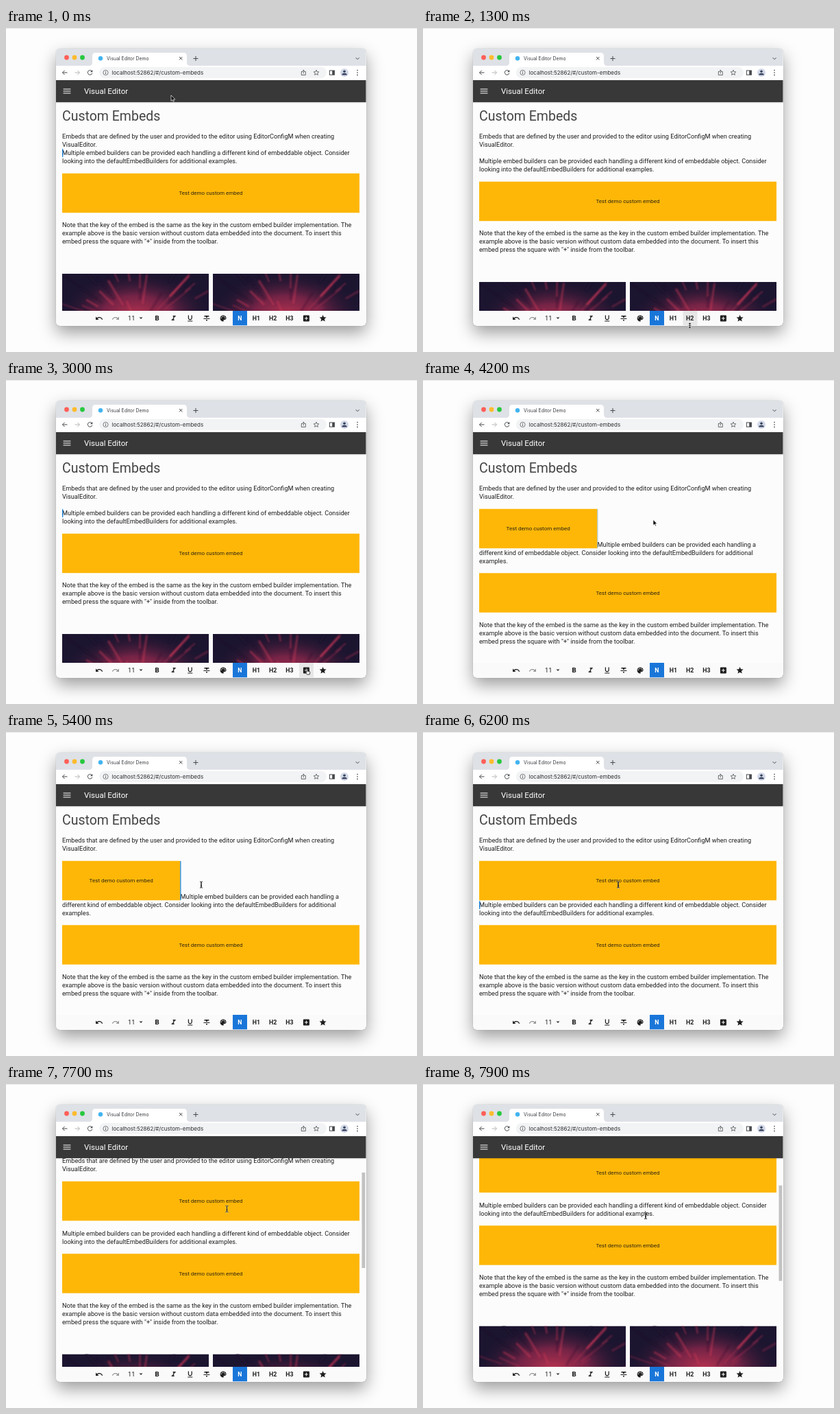
An HTML page for the animation above (8000 ms loop, 600 by 472 pixels).

```html
<!DOCTYPE html>
<html lang="en">
<head>
<meta charset="utf-8">
<title>Visual Editor Demo</title>
<style>
  html, body { margin: 0; width: 100%; height: 100%; overflow: hidden; background: #fdfdfd; }
  #stage { position: absolute; left: 0; top: 0; width: 600px; height: 472px; overflow: hidden; }
  #shadow {
    position: absolute; left: 73px; top: 30px; width: 452.5px; height: 403.5px; border-radius: 6px;
    box-shadow: 0 10px 25px rgba(0,0,0,.38), 0 0 1px rgba(0,0,0,.45);
  }
  svg { position: absolute; left: 0; top: 0; }
  text { font-family: Roboto, sans-serif; white-space: pre; }
  .ui { font-family: Inter, sans-serif; }
  .body { font-size: 9.18px; fill: #1e1e1e; }
  .label { font-size: 8.03px; fill: #2b2411; text-anchor: middle; }
  .head { font-size: 8.8px; font-weight: 700; text-anchor: middle; fill: #1e1e1e; }
  .line { fill: none; stroke: #46494d; stroke-width: 1; }
</style>
</head>
<body>
<div id="stage"><div id="shadow"></div></div>
<script>
const LOOP = 8000, STEP = 100;
const AMBER = '#feb707';

const icons = {
  undo: 'M12.5 8c-2.65 0-5.05.99-6.9 2.6L2 7v9h9l-3.62-3.62c1.39-1.16 3.16-1.88 5.12-1.88 3.54 0 6.55 2.31 7.6 5.5l2.37-.78C21.08 11.03 17.15 8 12.5 8z',
  drop: 'M7 10l5 5 5-5z',
  bold: 'M15.6 10.79c.97-.67 1.65-1.77 1.65-2.79 0-2.26-1.75-4-4-4H7v14h7.04c2.09 0 3.71-1.7 3.71-3.79 0-1.52-.86-2.82-2.15-3.42zM10 6.5h3c.83 0 1.5.67 1.5 1.5s-.67 1.5-1.5 1.5h-3v-3zm3.5 9H10v-3h3.5c.83 0 1.5.67 1.5 1.5s-.67 1.5-1.5 1.5z',
  italic: 'M10 4v3h2.21l-3.42 8H6v3h8v-3h-2.21l3.42-8H18V4z',
  under: 'M12 17c3.31 0 6-2.69 6-6V3h-2.5v8c0 1.93-1.57 3.5-3.5 3.5S8.5 12.93 8.5 11V3H6v8c0 3.31 2.69 6 6 6zm-7 2v2h14v-2H5z',
  strike: 'M10 19h4v-3h-4v3zM5 4v3h5v3h4V7h5V4H5zM3 14h18v-2H3v2z',
  palette: 'M12 3c-4.97 0-9 4.03-9 9s4.03 9 9 9c.83 0 1.5-.67 1.5-1.5 0-.39-.15-.74-.39-1.01-.23-.26-.38-.61-.38-.99 0-.83.67-1.5 1.5-1.5H16c2.76 0 5-2.24 5-5 0-4.42-4.03-8-9-8zM6.5 12a1.5 1.5 0 1 1 0-3 1.5 1.5 0 0 1 0 3zm3-4a1.5 1.5 0 1 1 0-3 1.5 1.5 0 0 1 0 3zm5 0a1.5 1.5 0 1 1 0-3 1.5 1.5 0 0 1 0 3zm3 4a1.5 1.5 0 1 1 0-3 1.5 1.5 0 0 1 0 3z',
  add: 'M19 3H5a2 2 0 0 0-2 2v14a2 2 0 0 0 2 2h14a2 2 0 0 0 2-2V5a2 2 0 0 0-2-2zm-2 10h-4v4h-2v-4H7v-2h4V7h2v4h4v2z',
  star: 'M12 17.27L18.18 21l-1.64-7.03L22 9.24l-7.19-.61L12 2 9.19 8.63 2 9.24l5.46 4.73L5.82 21z',
  menu: 'M3 18h18v-2H3v2zm0-5h18v-2H3v2zm0-7v2h18V6H3z'
};

const rect = (x, y, w, h, fill, more = '') =>
  `<rect x="${x}" y="${y}" width="${w}" height="${h}" fill="${fill}" ${more}/>`;
const circle = (x, y, r, fill, more = '') =>
  `<circle cx="${x}" cy="${y}" r="${r}" fill="${fill}" ${more}/>`;
const line = (d, more = '') => `<path class="line" d="${d}" ${more}/>`;
const text = (x, y, str, more) => `<text x="${x}" y="${y}" ${more}>${str}</text>`;
const icon = (name, x, y, fill = '#1e1e1e', s = .5, flip = 1) =>
  `<path d="${icons[name]}" fill="${fill}" transform="translate(${x} ${y}) scale(${s * flip} ${s}) translate(-12 -12)"/>`;
const para = (x, y, lines, first = x) =>
  lines.map((s, i) => text(i ? x : first, y + 12 * i, s, 'class="body"')).join('');

// Soft red nebula: glows plus a fan of seeded streaks
function nebula() {
  let seed = 7, out = '';
  const rnd = () => (seed = seed * 16807 % 2147483647) / 2147483647;
  for (let i = 0; i < 34; i++) {
    const a = Math.PI * (1.02 + .96 * rnd()), r = 18 + 62 * rnd(), len = 14 + 38 * rnd();
    const c = Math.cos(a) * 1.45, s = Math.sin(a);
    out += `<path d="M${(112 + c * r).toFixed(1)} ${(82 + s * r).toFixed(1)}l${(c * len).toFixed(1)} ${(s * len).toFixed(1)}"
      stroke="${i % 3 ? '#d63a5a' : '#23142f'}" stroke-width="${(1 + 2.4 * rnd()).toFixed(1)}" opacity="${(.25 + .35 * rnd()).toFixed(2)}"/>`;
  }
  return `<symbol id="photo" viewBox="0 0 214 120">${rect(0, 0, 214, 120, '#1c1530')}
    ${rect(0, 0, 214, 120, 'url(#glow)')}<g filter="url(#soft)">${out}</g></symbol>`;
}

const defs = `<defs>
  <clipPath id="frame"><rect x="73" y="30" width="452.5" height="403.5" rx="6"/></clipPath>
  <clipPath id="view"><rect x="73" y="108" width="452.5" height="304"/></clipPath>
  <radialGradient id="glow" gradientUnits="userSpaceOnUse" cx="0" cy="0" r="1" gradientTransform="translate(108 62) scale(112 66)">
    <stop offset="0" stop-color="#b83250"/><stop offset=".45" stop-color="#84264a" stop-opacity=".85"/>
    <stop offset="1" stop-color="#1c1530" stop-opacity="0"/></radialGradient>
  <linearGradient id="edge" x2="0" y2="1"><stop stop-color="#000" stop-opacity=".2"/><stop offset="1" stop-opacity="0"/></linearGradient>
  <filter id="soft"><feGaussianBlur stdDeviation=".9"/></filter>${nebula()}</defs>`;

const browser = rect(73, 30, 453, 25, '#dee1e6') +
  ['#fe5f57', '#febc2e', '#28c840'].map((c, i) => circle(88.5 + 11.5 * i, 43, 3.4, c)).join('') +
  '<path d="M121 55q5 0 5-5V41q0-5 5-5H259q5 0 5 5v9q0 5 5 5z" fill="#fff"/>' +
  circle(138, 44.3, 3.2, '#42b4f0') +
  text(147, 47, 'Visual Editor Demo', 'class="ui" font-size="6.9" fill="#3a3d41"') +
  line('M253 42l4.4 4.4m0-4.4l-4.4 4.4M277 41v7m-3.5-3.5h7M510.6 43.2l2.5 2.5 2.5-2.5') +
  rect(73, 55, 453, 21, '#fff') +
  rect(136, 57, 332, 16, '#f1f3f4', 'rx="8"') +
  line('M89.5 65h-7m3.2-3.2L82.5 65l3.2 3.2') +
  line('M100.5 65h7m-3.2-3.2l3.2 3.2-3.2 3.2', 'style="stroke:#b4b6b9"') +
  line('M125.2 62.8a3.3 3.3 0 1 0 .6 3') +
  '<path d="M126.3 61v3.2h-3.2z" fill="#46494d"/>' +
  line('M145.5 64.6v2.4m0-4.2v1', 'style="stroke-width:.9"') +
  circle(145.5, 65, 3.6, 'none', 'stroke="#5b5e62" stroke-width=".8"') +
  text(154.5, 68, 'localhost:52862/#/custom-embeds', 'class="ui" font-size="8" fill="#2b2d30"') +
  line('M433 63.5h-1.7v5h6v-5h-1.7M434.3 66.5v-5m-1.6 1.4l1.6-1.6 1.6 1.6', 'style="stroke-width:.8"') +
  `<path class="line" d="${icons.star}" transform="translate(453 65) scale(.38) translate(-12 -12)" style="stroke-width:2"/>` +
  rect(472.4, 62, 7, 6.2, 'none', 'stroke="#46494d"') + rect(476.2, 62, 3.2, 6.2, '#46494d') +
  circle(494, 65, 6, '#d3d9e8') + circle(494, 63.2, 1.8, '#39435c') +
  '<path d="M490.2 68.6q0-2.8 3.8-2.8t3.8 2.8z" fill="#39435c"/>' +
  [61.6, 65, 68.4].map(y => circle(513, y, .85, '#46494d')).join('');

const appBar = rect(73, 76, 453, 32, '#383838') + rect(73, 108, 453, 2, 'url(#edge)') +
  icon('menu', 89, 92, '#fff', .6) +
  text(114, 96, 'Visual Editor', 'font-size="11.5" fill="#fff"');

const tools = rect(73, 412, 453, 22, '#fafafa') +
  '<rect id="hover" y="412" width="21" height="21.5" fill="#e6e6e6"/>' +
  icon('undo', 136, 423) + icon('undo', 160, 423, '#9a9a9a', .5, -1) +
  text(178, 426.2, '11', 'class="body"') + icon('drop', 197, 422.6, '#333', .5) +
  ['bold', 'italic', 'under', 'strike', 'palette'].map((n, i) => icon(n, 220.5 + 24.15 * i, 423)).join('') +
  rect(331, 412, 21, 21.5, '#1976d9') +
  ['N', 'H1', 'H2', 'H3'].map((s, i) =>
    text(341.3 + 24.2 * i, 426.1, s, 'class="head"' + (i ? '' : ' style="fill:#fff"'))).join('') +
  icon('add', 438.4, 423) + icon('star', 462.6, 423);

const page = '<g id="page">' +
  text(82, 135, 'Custom Embeds', 'font-size="19.5" fill="#444"') +
  para(82, 160.7, ['Embeds that are defined by the user and provided to the editor using EditorConfigM when creating', 'VisualEditor.']) +
  `<g id="embed"><rect id="box" x="82" y="187.8" height="57.4" fill="${AMBER}"/>` +
  text(0, 219.4, 'Test demo custom embed', 'id="tag" class="label"') + '</g>' +
  '<g id="plain">' + para(82, 0, ['Multiple embed builders can be provided each handling a different kind of embeddable object. Consider',
    'looking into the defaultEmbedBuilders for additional examples.']) + '</g>' +
  '<g id="inline">' + para(82, 242.8, ['Multiple embed builders can be provided each handling a',
    'different kind of embeddable object. Consider looking into the defaultEmbedBuilders for additional', 'examples.'], 254.6) + '</g>' +
  '<g id="rest">' + rect(82, 0, 434, 57.4, AMBER) +
  text(299, 31.4, 'Test demo custom embed', 'class="label"') +
  para(82, 78.7, ['Note that the key of the embed is the same as the key in the custom embed builder implementation. The',
    'example above is the basic version without custom data embedded into the document. To insert this',
    'embed press the square with "+" inside from the toolbar.']) +
  [82, 302].map(x => `<use href="#photo" x="${x}" y="146.2" width="214" height="120"/>`).join('') + '</g>' +
  '<rect id="caret" width="1.3" fill="#1e88e5"/></g>' +
  '<rect id="thumb" x="519.5" width="4.8" fill="#c2c2c2"/>';

const pointers = `<g id="mouse">
  <path id="arrow" d="M0 0V8.2L1.9 6.5 3.1 9.3 4.4 8.7 3.2 6H5.8z" stroke="#fff" stroke-width=".7"/>
  <g id="beam" fill="none"><path d="M-2-4.6q2 0 2 1.2V3.4q0 1.2-2 1.2M2-4.6q-2 0-2 1.2V3.4q0 1.2 2 1.2M-1 1.4h2" stroke="#fff" stroke-width="1.7" opacity=".6"/>
    <path d="M-2-4.6q2 0 2 1.2V3.4q0 1.2-2 1.2M2-4.6q-2 0-2 1.2V3.4q0 1.2 2 1.2M-1 1.4h2" stroke="#111" stroke-width=".9"/></g>
  <path id="hand" d="M-.9-2.4a.8.8 0 0 1 1.6 0V.2l2.4.6q.9.3.7 1.3L3.2 5H-.4L-2.6 2.2q-.2-.9.7-.8l1 .7z" fill="#fff" stroke="#111" stroke-width=".8"/>
  <path id="size" d="M0-4.6L2.6-1.8H.6V-.5H2.6V.5H.6V1.8H2.6L0 4.6-2.6 1.8H-.6V.5H-2.6V-.5H-.6V-1.8H-2.6z" fill="#111" stroke="#fff" stroke-width=".6"/>
</g>`;

document.getElementById('stage').insertAdjacentHTML('beforeend',
  `<svg width="600" height="472" viewBox="0 0 600 472">${defs}${rect(0, 0, 600, 1, '#e8e8e8')}
  <g clip-path="url(#frame)">${rect(73, 30, 453, 404, '#fcfcfc')}<g clip-path="url(#view)">${page}</g>
  ${browser}${appBar}${tools}</g>${pointers}</svg>`);

const $ = id => document.getElementById(id);
const set = (id, attrs) => { for (const k in attrs) $(id).setAttribute(k, attrs[k]); };
const show = (id, on) => { $(id).style.display = on ? '' : 'none'; };

// Document edits: embed width, paragraph baseline, top of the rest, caret
const edits = [
  { at: 0, embed: 0, para: 184.7, rest: 211.8, caret: [82, 176, 12] },
  { at: 600, embed: 0, para: 196.7, rest: 223.8, caret: [82, 188, 12] },
  { at: 3150, embed: 172.4, para: 0, rest: 281.3, caret: [254.2, 188, 57] },
  { at: 6000, embed: 434, para: 254.7, rest: 281.3, caret: [82, 246, 12] },
  { at: 7500, embed: 434, para: 266.5, rest: 293.3, caret: [82, 257.6, 12] }
];
// time, x, y
const path = [
  [0, 241, 98], [200, 242, 100], [600, 300, 230], [900, 372, 424], [1300, 389.5, 433.5], [1500, 402, 441],
  [1800, 426, 430], [2200, 440, 424], [3400, 440, 424], [3600, 430, 414], [4200, 336, 203.5],
  [4500, 300, 220], [5400, 285, 222.5], [6500, 285, 222.5], [7000, 308, 196], [7500, 320, 172], [7900, 325, 192]
];
const scrolls = [[7500, 0], [7600, 14], [7700, 46], [7800, 74], [7900, 87]];

function at(track, t, col) {
  const i = track.findIndex(k => k[0] > t);
  if (i === 0) return track[0][col];
  if (i < 0) return track[track.length - 1][col];
  const a = track[i - 1], b = track[i];
  return a[col] + (b[col] - a[col]) * (t - a[0]) / (b[0] - a[0]);
}

function blink(age) {
  const p = age % 1000;
  if (p >= 500) return 0;
  return age < 1000 ? 1 : Math.min(1, p / 150);
}

function draw(t) {
  const s = edits.filter(e => e.at <= t).pop();
  const inline = s.para === 0;
  const scroll = at(scrolls, t, 1);
  show('embed', s.embed);
  set('box', { width: s.embed });
  set('tag', { x: 82 + s.embed / 2 });
  show('plain', !inline);
  show('inline', inline);
  set('plain', { transform: `translate(0 ${s.para})` });
  set('rest', { transform: `translate(0 ${s.rest})` });
  const [cx, cy, ch] = s.caret;
  set('caret', { x: cx, y: cy, height: ch, opacity: scroll ? 0 : blink(t - s.at) });
  set('page', { transform: `translate(0 ${-scroll})` });
  show('thumb', scroll);
  set('thumb', { y: 108 + scroll * 304 / 665, height: 139 });

  const x = at(path, t, 1), y = at(path, t, 2);
  const slot = Math.round((x - 341.3) / 24.25);
  const over = y > 412 && y < 436;
  show('hover', over);
  set('hover', { x: 331 + 24.25 * slot });
  const kind = y < 108 || y >= 437 ? 'arrow' : y > 430 ? 'size' : over ? 'hand' : inline && t < 4600 ? 'arrow' : 'beam';
  for (const k of ['arrow', 'beam', 'hand', 'size']) show(k, k === kind);
  set('mouse', { transform: `translate(${x} ${y})` });
}

const start = performance.now();
function tick() {
  const t = (performance.now() - start) % LOOP;
  draw(Math.floor(t / STEP) * STEP);
  requestAnimationFrame(tick);
}
tick();
</script>
</body>
</html>
```
